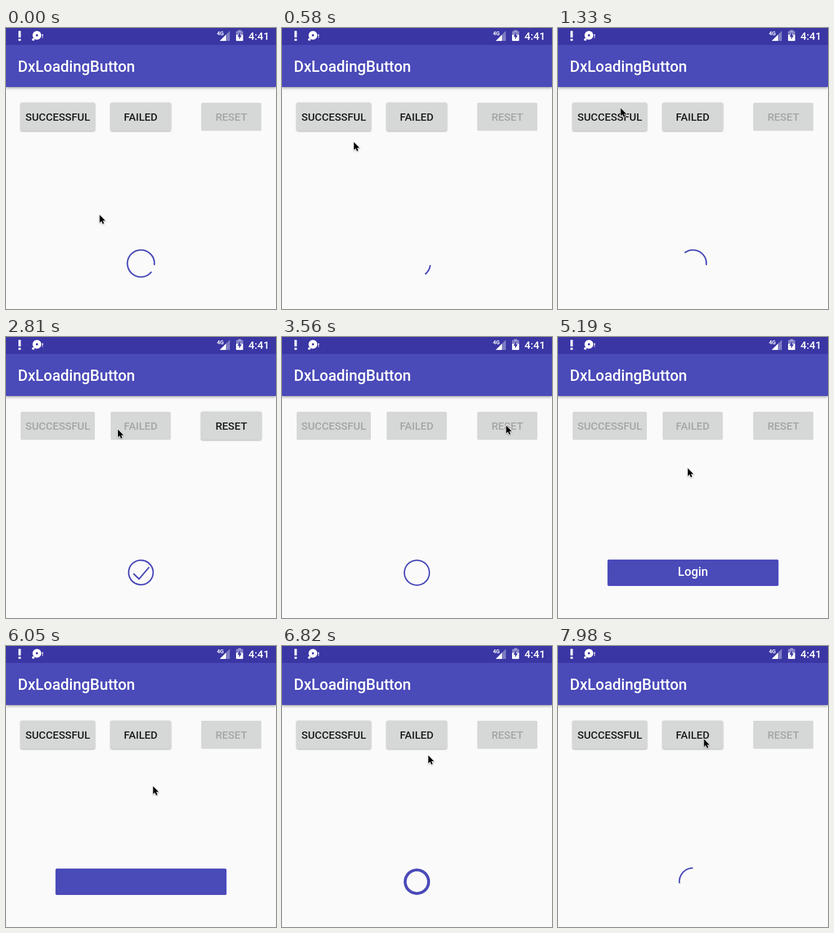
Animation of 480 by 500 pixels, one loop 8000 ms. Source, as an HTML page with a canvas:

```html
<!DOCTYPE html>
<html lang="en">
<head>
<meta charset="utf-8">
<title>Loading button</title>
<style>
  html, body { margin: 0; height: 100%; overflow: hidden; background: #fafafa; }
  canvas { display: block; }
</style>
</head>
<body>
<canvas id="stage" width="480" height="500"></canvas>
<script>
const ctx = document.getElementById('stage').getContext('2d');
const LOOP = 8000, PRIMARY = '#4a4ab9', TAU = Math.PI * 2;
const CX = 239.8, CY = 419, HALF = 23.5;
const SWEEP = 556; // one growing or shrinking pass of the spinner

const clamp = v => Math.max(0, Math.min(1, v));
const progress = (t, from, to) => clamp((t - from) / (to - from));
const ease = v => (1 - Math.cos(Math.PI * v)) / 2;
const mix = (a, b, v) => a + (b - a) * v;

// time, x, y of the pointer tip
const pointerPath = [
  [60, 166, 332], [800, 111, 148], [960, 111, 142], [2560, 111, 142],
  [2810, 198, 164], [3200, 398, 157], [4160, 398, 157], [4800, 167, 162],
  [5190, 230, 232], [5420, 282, 456], [5570, 262, 420], [5720, 262, 420],
  [6050, 261, 249], [6500, 260, 212], [7350, 259, 165]
];

function pointerAt(t) {
  const next = pointerPath.findIndex(p => p[0] > t);
  if (next === 0) return pointerPath[0].slice(1);
  if (next < 0) return pointerPath[pointerPath.length - 1].slice(1);
  const [t0, x0, y0] = pointerPath[next - 1], [t1, x1, y1] = pointerPath[next];
  const v = progress(t, t0, t1);
  return [mix(x0, x1, v), mix(y0, y1, v)];
}

function fillRound(x, y, w, h, r, color) {
  ctx.fillStyle = color;
  ctx.beginPath();
  ctx.roundRect(x, y, w, h, r);
  ctx.fill();
}

function polygon(points, color) {
  ctx.fillStyle = color;
  ctx.beginPath();
  points.forEach(([x, y]) => ctx.lineTo(x, y));
  ctx.closePath();
  ctx.fill();
}

function disc(x, y, r, color) {
  ctx.fillStyle = color;
  ctx.beginPath();
  ctx.arc(x, y, r, 0, TAU);
  ctx.fill();
}

function label(text, x, y, size, color, align = 'left', weight = 500) {
  ctx.font = `${weight} ${size}px Roboto, sans-serif`;
  ctx.textAlign = align;
  ctx.fillStyle = color;
  ctx.fillText(text, x, y);
}

function withShadow(color, blur, dy, draw) {
  ctx.save();
  ctx.shadowColor = color;
  ctx.shadowBlur = blur;
  ctx.shadowOffsetY = dy;
  draw();
  ctx.restore();
}

function drawBars() {
  withShadow('rgba(0,0,0,.4)', 5, 1.5, () => fillRound(0, 30, 480, 75, 0, PRIMARY));
  fillRound(0, 0, 480, 30, 0, '#3a36a4');
  label('DxLoadingButton', 21, 78, 27, '#fff');
  label('4:41', 431, 21, 18.9, '#fff');
  label('4G', 375, 13, 9.5, '#fff', 'left', 700);

  // notifications
  fillRound(22, 5, 4.5, 12, 1, '#e9e9f6');
  fillRound(22, 19, 4.5, 4, 1, '#e9e9f6');
  disc(55, 13, 7.8, '#fff');
  disc(55, 13, 2, '#3a36a4');
  disc(48.5, 20.5, 2.3, '#fff');
  fillRound(64.3, 11, 1.6, 4, 0, '#fff');
  fillRound(64.3, 16, 1.6, 1.6, 0, '#fff');

  // signal and battery
  polygon([[398, 5], [398, 23], [380, 23]], 'rgba(255,255,255,.35)');
  polygon([[391, 12], [391, 23], [380, 23]], '#fff');
  fillRound(412.5, 3.5, 5.5, 3, 0, 'rgba(255,255,255,.4)');
  fillRound(409, 5.5, 12.5, 8, 1, 'rgba(255,255,255,.4)');
  fillRound(409, 12, 12.5, 11, 1, '#fff');
  polygon([[416, 8], [411.5, 15.5], [414.5, 15.5], [414.5, 20.5], [419, 13], [416, 13]], '#3a36a4');
}

function drawKey(text, x, width, enabled) {
  const face = () => fillRound(x, 133, width, 50, 2.5, '#d6d7d7');
  enabled ? withShadow('rgba(0,0,0,.38)', 3, 0.8, face) : face();
  label(text, x + width / 2, 165, 18.9, enabled ? '#1c1c1c' : '#a4a5a5', 'center');
}

function strokeArc(radius, from, to) {
  ctx.lineWidth = 2.6;
  ctx.strokeStyle = PRIMARY;
  ctx.beginPath();
  ctx.arc(CX, CY, radius, from * TAU / 360, to * TAU / 360);
  ctx.stroke();
}

function drawSpinner(elapsed, base) {
  const phase = (elapsed / SWEEP) % 2;
  const head = 360 * ease(clamp(phase)), tail = 360 * ease(clamp(phase - 1));
  strokeArc(24, base + tail, base + head);
}

function drawTick(amount) {
  if (amount <= 0) return;
  const split = 0.34;
  const a = clamp(amount / split), b = clamp((amount - split) / (1 - split));
  ctx.lineWidth = 2.6;
  ctx.strokeStyle = PRIMARY;
  ctx.beginPath();
  ctx.moveTo(226.5, 421);
  ctx.lineTo(mix(226.5, 236.5, a), mix(421, 430.5, a));
  if (b > 0) ctx.lineTo(mix(236.5, 254.5, b), mix(430.5, 409.5, b));
  ctx.stroke();
}

function drawHollow(inner) {
  disc(CX, CY + 0.4, HALF, PRIMARY);
  disc(CX, CY + 0.4, inner, '#fafafa');
}

function drawPill(open, textAlpha) {
  const half = mix(HALF, 152, open);
  fillRound(240 - half, 396, half * 2, 47, mix(HALF, 2.5, open), PRIMARY);
  if (textAlpha > 0) label('Login', 240, 425, 21.6, `rgba(255,255,255,${textAlpha})`, 'center');
}

function drawLoadingButton(t) {
  if (t < 1670) {
    drawSpinner(t + SWEEP * 1.187, 7);
  } else if (t < 3560) {
    const close = ease(progress(t, 1670, 1960));
    strokeArc(mix(24, 21.8, close), 7, 7 + mix(32, 360, close));
    drawTick(ease(progress(t, 1930, 2230)) - ease(progress(t, 3340, 3560)));
  } else if (t < 3790) {
    drawHollow(21 * (1 - ease(progress(t, 3560, 3790))));
  } else if (t < 6114) {
    // growth pauses briefly just after it begins
    const step = t < 3850 ? mix(0, 0.155, progress(t, 3790, 3850))
      : Math.max(0.155, progress(t, 3934, 4334));
    drawPill(ease(step), progress(t, 4340, 4560) * (1 - progress(t, 5680, 5900)));
  } else if (t < 6514) {
    drawPill(1 - ease(progress(t, 6114, 6514)), 0);
  } else if (t < 7063) {
    drawHollow(HALF * ease(progress(t, 6514, 6960)));
  } else {
    drawSpinner(t - 7063, 270);
  }
}

function drawPointer(x, y) {
  const shape = new Path2D('M0 0V14L3.2 11 5.4 16 7.8 15 5.6 10.2H10Z');
  ctx.save();
  ctx.translate(x + 0.5, y + 0.5);
  withShadow('rgba(0,0,0,.35)', 2, 1, () => {
    ctx.lineWidth = 1.6;
    ctx.strokeStyle = '#fff';
    ctx.stroke(shape);
  });
  ctx.fillStyle = '#000';
  ctx.fill(shape);
  ctx.restore();
}

function draw(t) {
  fillRound(0, 0, 480, 500, 0, '#fafafa');
  drawBars();
  const loading = t < 1620 || t >= 5700;
  drawKey('SUCCESSFUL', 26, 132, loading);
  drawKey('FAILED', 186, 107, loading);
  drawKey('RESET', 347, 107, t >= 1620 && t < 3340);
  drawLoadingButton(t);
  drawPointer(...pointerAt(t));
}

const start = performance.now();
function tick() {
  draw((performance.now() - start) % LOOP);
  requestAnimationFrame(tick);
}
tick();
</script>
</body>
</html>
```
